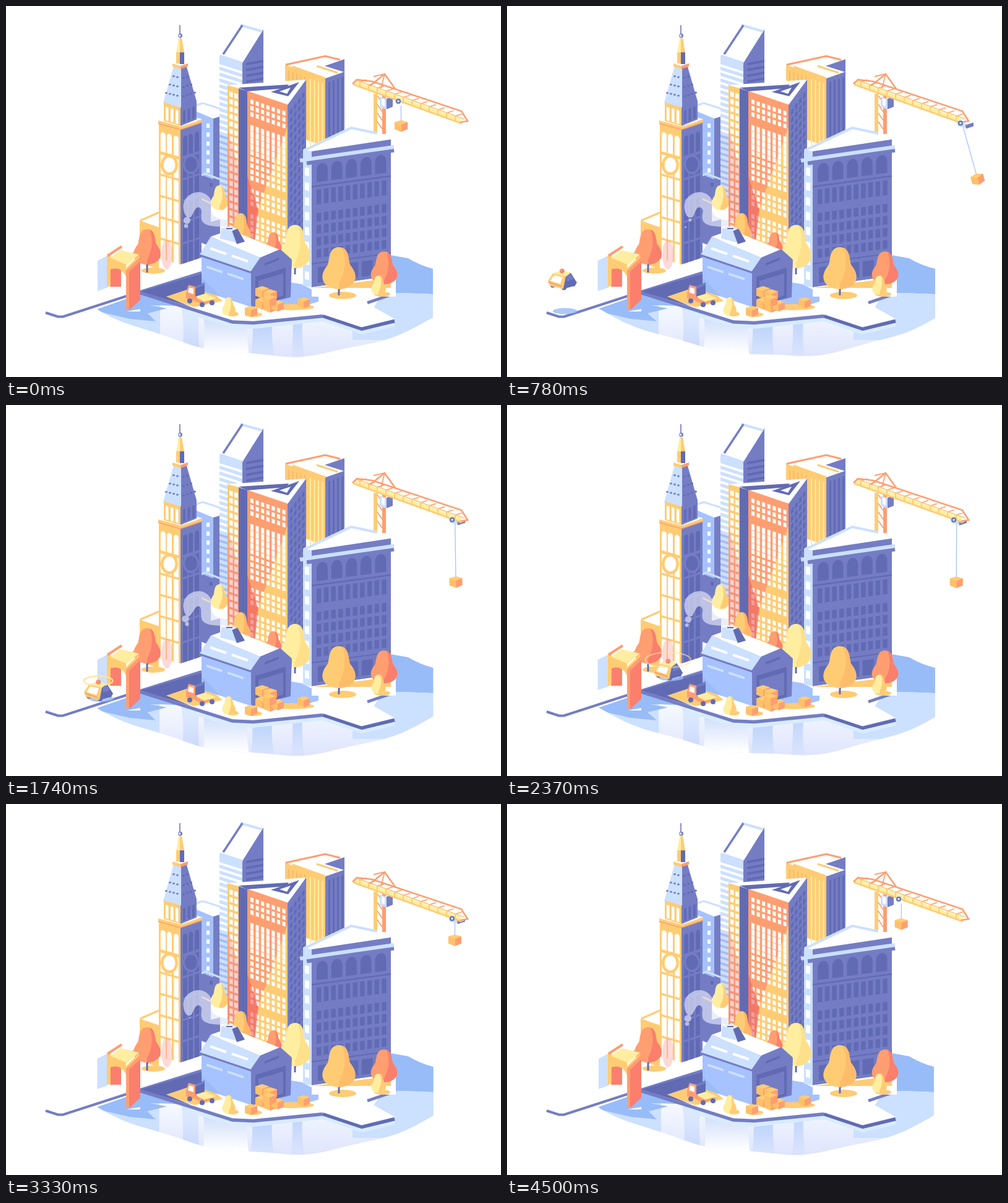
An HTML page with a canvas for the animation above (4.53 s loop, 800 by 600 pixels).

```html
<!DOCTYPE html>
<html lang="en">
<meta charset="utf-8">
<title>Isometric city</title>
<style>
html, body { margin: 0; width: 100%; height: 100%; overflow: hidden; background: #fff }
canvas { display: block }
</style>
<canvas id="stage" width="800" height="600"></canvas>
<script>
const ctx = document.getElementById('stage').getContext('2d');
const LOOP = 4530, TAU = Math.PI * 2;
const purple = '#747dc4', dark = '#616bb4', pale = '#cce0ff', sky = '#a6c2ff', water = '#98bcf8',
  yellow = '#ffcc74', cream = '#ffeea0', orange = '#ff9e70', coral = '#fa7f6d', white = '#fff';

const fill = (color, path) => { ctx.fillStyle = color; ctx.fill(new Path2D('M' + path + 'Z')); };
const line = (color, width, path) => {
  ctx.strokeStyle = color; ctx.lineWidth = width; ctx.stroke(new Path2D('M' + path));
};
const oval = (color, x, y, rx, ry = rx) => {
  ctx.fillStyle = color; ctx.beginPath(); ctx.ellipse(x, y, rx, ry, 0, 0, TAU); ctx.fill();
};
const ring = (color, width, x, y, rx, ry = rx) => {
  ctx.strokeStyle = color; ctx.lineWidth = width; ctx.beginPath(); ctx.ellipse(x, y, rx, ry, 0, 0, TAU); ctx.stroke();
};
const rect = (color, x, y, w, h) => { ctx.fillStyle = color; ctx.fillRect(x, y, w, h); };
const grid = (color, x, y, w, h, cols, rows, dx, dy) => {
  for (let i = 0; i < cols * rows; i++) rect(color, x + i % cols * dx, y + (i / cols | 0) * dy, w, h);
};
const fade = (y0, c0, y1, c1) => {
  const g = ctx.createLinearGradient(0, y0, 0, y1);
  g.addColorStop(0, c0); g.addColorStop(1, c1);
  return g;
};
// A wall from its top left corner; details are drawn in its sloping plane
const wall = (color, x, y, slope, w, h, details = () => {}) => {
  ctx.save(); ctx.transform(1, slope, 0, 1, x, y); rect(color, 0, 0, w, h); details(); ctx.restore();
};
// Two walls that meet at the front edge, whose top is at x, y
const block = (x, y, h, [colorL, l, slopeL, detailsL], [colorR, r, slopeR, detailsR]) => {
  wall(colorL, x - l, y - l * slopeL, slopeL, l, h, detailsL);
  wall(colorR, x, y, -slopeR, r, h, detailsR);
};
const clipped = (path, draw) => {
  ctx.save(); ctx.clip(new Path2D('M' + path + 'Z')); draw(); ctx.restore();
};

const ease = (t, from, to) => {
  const u = Math.max(0, Math.min(1, (t - from) / (to - from)));
  return (1 - Math.cos(Math.PI * u)) / 2;
};
// Step with a single soft overshoot
const spring = t => {
  const a = Math.max(0, t) / 750 * Math.PI;
  return 1 - Math.exp(-.66 * a) * (Math.cos(a) + .66 * Math.sin(a));
};
// Swing in degrees of a load whose carrier starts at 0 and stops
const swing = t => {
  const s = Math.max(0, t) / 200;
  return 24 * s ** 3 * Math.exp(-s) * Math.sin(TAU * (1190 - t) / 1000);
};

function drawWater(t) {
  const w = Math.cos(TAU * t / 1510), left = 147.3 + .7 * w, right = 691 - w;
  const shore = x => 566 - (x - 450) ** 2 * (x < 450 ? .00083 : .00105) + 2 * Math.sin(x / 24 + w * .6);
  fill(pale, `${left},412 165,403 165,455 ${left},461`);
  fill(water, '200,402 217,391 217,410');
  fill(water, `600,401 L622,403 650,408 Q668,419 ${right},425 V466 H600`);
  let outline = '217,466 366,512 400,514 512,502 570,523 610,464 640,464 ' + `${right},466`;
  for (let x = right; x > left; x -= 4) outline += ` ${x},${shore(x)}`;
  clipped(outline + ` ${left},490`, () => {
    rect(fade(490, '#f4f8ff', 565, '#dfe5fd'), 140, 460, 560, 110);
    rect(pale, 140, 460, 107 + 2 * w, 80); rect(pale, 560, 460, 140, 80);
    fill(water, `140,492 217,460 295,486 250,484 232,484 260,489 ${228 + w},497 242,510 200,506`);
    const reflect = (x, width, top, bottom) =>
      fill(fade(505, top, 560, bottom), `${x},480 h${width} q-9,45 ${w},95 h${-width} q8,-50 ${-w},-95`);
    reflect(282, 33, '#dce8fe', '#c9d8fb');
    reflect(316, 78, '#d2dffb', '#ffffff');
    reflect(394, 40, '#b8d1fa', '#d6e2fd');
    reflect(459, 24, '#c0d6fb', '#d9e2fd');
    line('#d9ecff', 8, '290,493 366,516 400,518 512,506 575,527 628,514');
  });
}

function drawLand() {
  fill(white, '217,459 366,508 400,510 512,499 575,519 628,506 584,481 622,466 622,435 316,425');
  line(purple, 4, '64,496 84,502.5 92,502.5 217,462 316,431');
  fill(dark, '217,462 316,433 316,452 260,470 300,487');
  line(purple, 5.5, '217,464 366,511 400,512.5 512,501.5');
  line(dark, 5.5, '512,501.5 575,522.5 628,509.5');
  line(purple, 5, '584,480 622,467');
  fill(sky, '460,447 478,450 505,464 505,478 465,490 440,480');
  fill(yellow, '259,470 318,450 350,477 304,487');
  fill(yellow, '495,454 622,441 622,458 560,456');
}

// Pear-shaped crown w wide, with an optional trunk
function tree(x, top, bottom, w, left, right, trunk) {
  ctx.save(); ctx.translate(x, top);
  const h = bottom - top;
  if (trunk) { line(dark, 3, `0,${h - 8} V${h + trunk}`); line(dark, 1.5, `0,${h + 2} l5,-7`); }
  ctx.scale(w / 100, h / 100);
  const half = side => `0,0 C${34 * side},0 ${30 * side},30 ${36 * side},42 C${78 * side},80 ${35 * side},100 0,100`;
  fill(left, half(-1)); fill(left, half(1));
  clipped(half(1), () => fill(right, '10,0 Q35,50 -10,100 H60 V0'));
  ctx.restore();
}

// Cube around its centre; s is half of its width
function cube(x, y, s) {
  fill(yellow, `${x - s},${y - .6 * s} ${x},${y - .9 * s} ${x + s},${y - .6 * s} ${x},${y}`);
  block(x, y - .2 * s, s * 1.1, ['#ffc069', s, .4], [orange, s, .4]);
}

function drawBackBuildings() {
  fill(white, '306,161 318,157 345,166 335,184 308,172');
  line(pale, 3, '306,161 318,157 346,166');
  block(335, 182, 108, [sky, 27, .42], [purple, 10, .3]);
  grid(white, 324, 190, 5, 7, 1, 6, 0, 14.5);
  wall(purple, 316, 273, .4, 30, 110); rect(dark, 329, 286, 5, 6);
  line(pale, 3, '316,274 322,271 345,280');
  fill(white, '331,314 358,322 358,342 331,349'); line(yellow, 2.5, '316,312 352,329');

  wall(pale, 345, 80, .32, 37, 230, () => {
    for (let i = 0; i < 23; i++) rect(i < 12 ? white : '#a9bcf0', 0, 14 + i * 9.5, 37, 4);
  });
  fill(purple, '382,92 416,37 416,127 382,135');
  wall(purple, 382, 95, -.18, 34, 40, () => grid(dark, 6, -2, 28, 4, 1, 5, 0, 9.5));
  fill(white, '345,80 380,30 416,38 382,92');
  line(pale, 4, '379,31 414,41'); line(purple, 3.5, '351,78 382,31'); line(pale, 3, '346,80 382,92');

  block(516, 117, 110,
    [yellow, 65, .34, () => { grid('#f6b96e', 5, 8, 2, 110, 5, 1, 6.5, 0); grid(cream, 40, 9, 2, 110, 4, 1, 6.5, 0); }],
    [purple, 31, .35, () => grid(dark, 5, 8, 3, 95, 4, 1, 7, 0)]);
  fill(white, '451,95 516,79 547,88 515,97 547,106 516,117');
  line(orange, 3, '452,95 516,81 540,87'); line(yellow, 3, '463,98 516,117'); line(yellow, 3, '502,97 536,108');
  fill(purple, '515,97 547,86 547,107');
}

function drawCraneMast() {
  rect(yellow, 594, 142, 6, 64); rect(orange, 608, 143, 6, 64);
  for (let y = 145; y < 195; y += 14) line(orange, 1.6, `600,${y} 608,${y + 12}`);
  block(615, 150, 17, [pale, 11, .3, () => rect(white, 3, 2, 5, 11)], [purple, 10, .4]);
}

function drawOffice() {
  wall(fade(60, yellow, 160, orange), 358, 127, .33, 18, 240, () => {
    grid(white, 3, 10, 5.5, 8, 2, 19, 8, 12);
    fill('rgba(235,130,130,.35)', '0,70 18,130 18,220 0,220');
  });
  wall(dark, 376, 133, .29, 14, 225);
  clipped('390,137 455,160 455,395 390,395', () => {
    rect(yellow, 390, 130, 65, 270);
    fill(orange, '390,130 455,150 455,195 405,335 400,400 390,400');
    wall('transparent', 390, 137, .35, 65, 0, () => {
      for (let floor = 0; floor < 24; floor++) {
        const tall = floor > 3 && floor < 8;
        if (![3, 13, 17].includes(floor)) grid(white, 5, 12 + floor * 10.3, 5, tall ? 9.5 : 7, 7, 1, 8.6, 0);
      }
    });
    fill('rgba(235,95,95,.6)', '390,275 408,330 400,395 390,395');
  });
  wall(purple, 455, 159, -1.35, 30, 240, () => grid(dark, 4, 16, 4, 8, 4, 20, 6.5, 12.5));
  fill(white, '358,128 485,119 455,160 376,133');
  fill(dark, '376,132 457,127 453,133 390,138');
  fill(dark, '428,139 474,123 456,146'); fill(white, '442,138 460,132 454,142');
  line(orange, 3, '390,139 455,161');
}

function drawFlatiron() {
  fill(white, '480,232 558,195 622,215 497,240');
  line(pale, 4, '481,234 558,197 600,206');
  block(494, 235, 220, [pale, 14, .2, () => grid(white, 3, 28, 7, 13, 1, 8, 0, 24)], [purple, 128, .15]);
  wall(purple, 494, 254, -.135, 128, 200, () => {
    for (let x = 8; x < 110; x += 23.6) fill(dark, `${x},32 V13 A9,11 0 0 1 ${x + 18},13 V32`);
    rect(dark, 0, 37, 128, 2.5); grid(dark, 8, 44, 7.5, 24, 10, 1, 11.7, 0);
    grid(dark, 8, 82, 7.5, 14, 10, 4, 11.7, 19.5);
    rect(dark, 0, 162, 128, 2); grid(dark, 10, 170, 18, 25, 5, 1, 23.6, 0);
  });
  fill('#fff', '494,455 630,436 630,470 494,470');
  fill(yellow, '495,456 622,440 622,456 560,456');
  line(purple, 7, '486,254 627,233'); line(pale, 6, '475,250 494,247 627,228');
}

function drawClockTower() {
  wall(yellow, 216, 347, .35, 31, 68); line(yellow, 3, '217,347 247,334');
  line(dark, 1.5, '281,31 V46'); oval(purple, 281.5, 48, 3.5); oval(pale, 280.5, 48, 2);
  fill(cream, '279,52 284,52 288,76 275,76'); fill(yellow, '281,52 284,52 288,76 281,76');
  rect(yellow, 275, 75, 6, 18); rect(dark, 281, 75, 7, 19);
  fill(pale, '271,97 283,97 283,166 254,157'); fill(purple, '283,97 291,95 308,154 283,166');
  block(282, 97, 5, [yellow, 13, .3], [orange, 12, .35]);
  for (let row = 0; row < 3; row++) for (let i = 0; i < 2 + row; i++) {
    const y = 115 + row * 15;
    oval(purple, 277 - i * 6, y - i * 1.5, 2, 1.6); oval(dark, 287 + i * 6, y + 1 - i * 2, 2, 1.6);
  }
  block(282, 165, 30,
    [yellow, 27, .3, () => grid(white, 3, 6, 4.5, 22, 3, 1, 8, 0)],
    [purple, 26, .4, () => grid(dark, 4, 7, 4, 20, 3, 1, 7.5, 0)]);
  const windows = (color, x, w) => {
    fill(color, `${x},45 V18 a${w / 2},5 0 0 1 ${w},0 V45`);
    grid(color, x, 50, w, 31, 1, 5, 0, 34.5);
  };
  block(282, 199, 219,
    [yellow, 35, .28, () => { for (const x of [3, 13, 24]) windows(white, x, 8); }],
    [purple, 34, .33, () => { for (const x of [4, 13, 23]) windows(dark, x, 7); }]);
  fill(white, '246,185 282,174 317,183 282,195');
  block(282, 164, 30,
    [yellow, 27, .3, () => grid(white, 3, 6, 4.5, 22, 3, 1, 8, 0)],
    [purple, 26, .4, () => grid(dark, 4, 7, 4, 20, 3, 1, 7.5, 0)]);
  block(282, 195, 5, [yellow, 36, .28], [yellow, 35, .33]); line(orange, 1.5, '246,190 282,200 317,188');
  oval(yellow, 264, 257, 14, 17); oval(white, 264, 257, 9.5, 12);
  oval(purple, 299, 256, 13, 16); oval(dark, 299, 256, 10, 12);
  oval('rgba(250,150,145,.35)', 260, 402, 9, 24);
}

function drawWarehouse() {
  fill(purple, '396,431 412,407 442,394 462,411 460,471 396,488');
  wall(sky, 316, 403, .335, 80, 57, () => {
    fill(water, '0,36 30,57 0,57'); grid(pale, 8, 14, 26, 4, 2, 1, 34, 0);
  });
  wall(dark, 403, 438, -.3, 49, 48, () => rect(purple, 5, 8, 40, 36));
  wall(dark, 418, 416, -.4, 23, 4);
  fill(pale, '313,402 331,373 412,407 396,431'); fill(white, '331,373 362,362 442,394 412,407');
  line(purple, 3, '313,403 396,431 412,408 443,395 461,411');
  line(white, 4, '330,392 356,401'); line(white, 4, '365,404 391,413');
  fill(pale, '348,359 365,363 377,384 346,376'); fill(dark, '365,363 374,360 386,381 373,385');
  fill('#e6efff', '348,359 358,356 374,360 365,364'); line(dark, 2, '356,360 366,360');
}

function drawYard() {
  oval(yellow, 400, 499, 14, 4); oval(yellow, 462, 487, 36, 5); oval(yellow, 366, 498, 10, 4);
  cube(396, 494, 10); cube(481, 480, 10);
  for (let i = 0; i < 4; i++) cube(414 + i % 2 * 13, 463 + i % 2 * 5 + (i / 2 | 0) * 18, 11);
  cube(439, 485, 10); cube(426, 477, 11);
  wall(dark, 304, 454, -.4, 17, 20, () => rect(purple, 0, 0, 17, 4));
  fill(orange, '291,464 295,451 306,454 306,477 291,473'); fill(white, '294,463 296,455 303,457 303,466');
  fill(cream, '306,470 322,465 340,473 320,480'); fill(orange, '306,471 320,478 341,473 320,483 306,478');
  for (const [x, y] of [[297, 477], [317, 483], [333, 480]]) oval(dark, x, y, 4);
  tree(360, 471, 501, 20, cream, yellow);
}

function drawGateBack() {
  rect(coral, 168, 412, 18, 42); wall(yellow, 163, 404, -.3, 6, 50);
  line(orange, 4, '164,404 187,389');
}

function drawGateFront() {
  fill(cream, '168,407 186,395 215,402 194,420'); fill(yellow, '168,407 194,418 194,438 Q186,420 168,426');
  wall(orange, 194, 427, -.95, 23, 66); wall(coral, 199, 430, -.95, 18, 62);
  fill(white, '195,494 217,490 217,494'); line(yellow, 3, '194,426 215,405');
}

function drawCar(t) {
  if (t < 530 || t > 2760) return;
  const drive = Math.max(0, t - 1000) / 1370, x = 89 + 171 * drive ** 1.7, ground = 477 - (x - 97) * .305;
  const fall = Math.min(1, (t - 530) / 350), height = 78 * (1 - fall * fall), size = ease(t, 530, 680);
  const landed = Math.max(0, t - 880), squash = .15 * Math.exp(-landed / 110) * Math.sin(landed / 60);
  oval('rgba(152,188,248,.8)', x + 5, ground + 14, 20 * size, 5 * size);
  ctx.save(); ctx.translate(x, ground - height + 17); ctx.scale(size * (1 + squash), size * (1 - squash)); ctx.translate(0, -17);
  for (const [wx, wy] of [[-15, 10], [3, 14], [18, 8]]) oval(dark, wx, wy, 4);
  fill(dark, '5,-5 14,-10 24,6 20,11 3,16 -1,13'); fill(purple, '7,-4 13,-8 19,0 8,4');
  fill(yellow, '-23,3 -15,-9 0,-14 14,-10 6,-4 2,16 -20,11'); fill(cream, '-15,-9 0,-14 14,-10 6,-4');
  fill(white, '-19,3 -13,-6 1,-3 -3,8'); line(orange, 2, '-22,5 -1,12');
  oval(coral, 0, -13, 3.8); oval(orange, -1, -14, 2);
  ctx.restore();
  if (t < 1560) return;
  const p = (t - 1560) / 500 % 1;
  ctx.globalAlpha = Math.min(1, 1.4 * (1 - p));
  ring('#ffe3a0', 2.5, x, ground - 15, 4 + 53 * p, 1 + 18 * p);
  ctx.globalAlpha = 1;
}

function drawCrane(t) {
  const x = 634 + 88 * (spring(t) - spring(t - 3300)), y = 154 + (x - 634) * .36;
  const rope = 25 + 61 * (ease(t, 200, 950) - spring(t - 2730));
  const angle = swing(t) - .8 * swing((t - 3300) * 1.7);
  ctx.save(); ctx.translate(x, y);
  if (x > 660) { fill(pale, '-7,-4 9,1 9,8 -4,5'); fill(purple, '8,3 21,-1 21,5 9,9'); }
  ctx.translate(4.5, 7); ctx.rotate(-angle * Math.PI / 180);
  line(sky, 1.3, `0,0 0,${rope}`); cube(0, rope + 8, 10.5);
  ctx.restore();
  fill(white, '566,119 590,122 736,170 746,186 736,190 560,126');
  wall(cream, 563, 121, .36, 172, 5, () => {
    for (let u = 8; u < 172; u += 14) { rect(yellow, u, -2, 2, 10); line(orange, 1.4, `${u},-1 ${u + 12},-9`); }
    rect(yellow, 3, -3, 174, 2); rect(yellow, -2, 5, 175, 3);
  });
  line(orange, 2.6, '560,126 567,119 592,122 736,170 746,186 734,188');
  line(orange, 2.6, '588,129 612,110 629,134'); line(orange, 1.8, '594,114 612,110 606,133');
  oval(pale, x, y, 4.5); ring(dark, 2, x, y, 3);
}

function drawSmoke(t) {
  const p = t / 2265, sway = 2 * Math.sin(TAU * p);
  ctx.fillStyle = 'rgba(226,229,249,.67)';
  const shape = new Path2D(`M358,356 C338,358 318,356 316,345 C314,335 ${319 + sway},331 313,326
    C306,323 304,334 ${299 + sway},341 C293,345 288,338 287,329 C284,314 296,301 312,301
    C327,302 335,315 332,325 C329,337 340,346 358,346Z`);
  const age = (p + .44) % 1, swell = Math.sin(Math.PI * age ** .6);
  for (const [x, y, r] of [[288 + 10 * age, 345 + 4 * swell * age, 6], [294 - 7 * age, 353 + 6 * age, 3.4]]) {
    shape.moveTo(x + r * swell, y); shape.arc(x, y, r * swell, 0, TAU);
  }
  ctx.fill(shape);
}

function draw(now) {
  const t = now % LOOP;
  ctx.clearRect(0, 0, 800, 600);
  drawWater(t); drawLand(); drawBackBuildings(); drawCraneMast();
  tree(345, 290, 330, 26, cream, yellow);
  drawOffice(); drawCrane(t); drawFlatiron(); drawClockTower();
  oval(yellow, 238, 428, 19, 5); tree(228, 361, 418, 41, orange, coral, 13);
  tree(379, 335, 385, 31, yellow, '#ffb56c'); tree(432, 366, 402, 25, orange, coral);
  tree(467, 354, 424, 46, cream, '#ffe08a', 10);
  drawGateBack(); drawCar(t); drawGateFront();
  drawWarehouse(); drawYard();
  oval(yellow, 544, 468, 22, 6); tree(538, 390, 458, 50, yellow, '#ffbd6c', 10);
  tree(611, 397, 450, 40, orange, coral); oval(yellow, 608, 466, 13, 4); tree(602, 436, 467, 22, cream, yellow);
  drawSmoke(t);
}

const start = performance.now();
(function tick() {
  draw(performance.now() - start);
  requestAnimationFrame(tick);
})();
</script>
</html>
```
